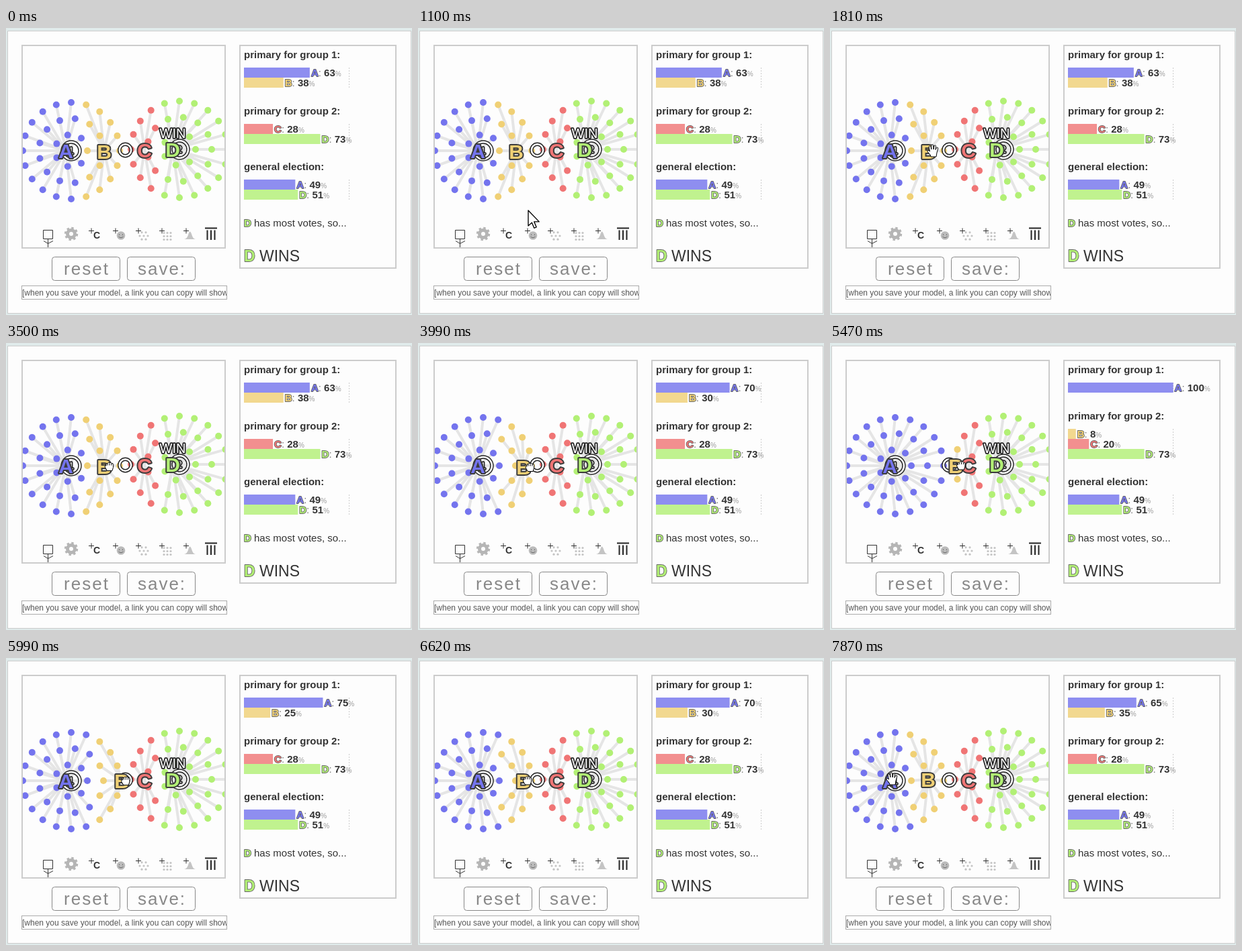
An HTML page for the animation above (8000 ms loop, 604 by 428 pixels).

```html
<!DOCTYPE html>
<html lang="en">
<head>
<meta charset="utf-8">
<title>Primary election sandbox</title>
<style>
html, body { margin: 0; width: 100%; height: 100%; overflow: hidden; background: #e0ebeb; }
svg { display: block; width: 604px; height: 428px; font-family: "Liberation Sans", Arial, sans-serif; font-size: 15px; fill: #333; }
.name { font-weight: bold; font-size: 30px; text-anchor: middle; stroke: #3c3c3c; stroke-width: 4px; stroke-linejoin: round; paint-order: stroke; }
.tag { font-weight: bold; stroke: #666; stroke-width: 1.8px; stroke-linejoin: round; paint-order: stroke; }
.white { fill: #fff; stroke: #222; stroke-width: 3.4px; stroke-linejoin: round; paint-order: stroke; text-anchor: middle; }
.title { font-weight: bold; }
.button { font-size: 26px; letter-spacing: 2px; text-anchor: middle; fill: #888; }
.box { fill: none; stroke: #ccc; stroke-width: 2; }
.thin { fill: none; stroke: #333; stroke-width: 1; }
</style>
</head>
<body>
<svg id="stage" viewBox="0 0 604 428">
  <defs>
    <clipPath id="arena"><rect x="25" y="27" width="300.5" height="300"/></clipPath>
    <clipPath id="field"><rect x="24" y="385" width="304" height="19"/></clipPath>
  </defs>
  <rect x="2.5" y="4.5" width="600" height="421" fill="#fdfdfd" stroke="#ccc"/>
  <g clip-path="url(#arena)">
    <g id="voters"></g>
    <g id="rings"></g>
    <g id="names"></g>
    <g id="tools"></g>
  </g>
  <rect class="box" x="24" y="26" width="302" height="302"/>
  <rect class="box" x="348" y="26" width="232" height="332"/>
  <rect id="reset" x="68.5" y="341.5" width="101" height="35" rx="4" stroke="#888"/>
  <text class="button" x="120" y="368">reset</text>
  <rect x="180.5" y="341.5" width="101" height="35" rx="4" fill="#fdfdfd" stroke="#888"/>
  <text class="button" x="232" y="368">save:</text>
  <rect x="23.5" y="384.5" width="305" height="20" fill="#fff" stroke="#aaa"/>
  <text x="24" y="399" font-size="12" fill="#555" clip-path="url(#field)">[when you save your model, a link you can copy will show up here]</text>
  <g id="panel"></g>
  <g id="cursor"></g>
</svg>
<script>
const LOOP = 8000;
const COLORS = { A: '#7474ee', B: '#f0d075', C: '#f07575', D: '#b2f075' };
const GROUPS = [{ x: 97, y: 183 }, { x: 258, y: 181 }];
const RINGS = [[24, 7], [48, 13], [72, 20]];
const $ = id => document.getElementById(id);

// Candidate B while dragged: time, x, y
const DRAG = [
  [0, 146, 183.5], [3750, 148, 184], [3870, 152, 184.5], [3990, 157, 185], [4110, 161, 185.5],
  [4230, 165, 186], [4380, 168, 186.5], [4530, 172.5, 187], [4680, 175, 187], [4800, 176.5, 186.5],
  [5050, 181, 185], [5200, 184, 184], [5320, 186, 183], [5470, 187, 182.5],
  [5750, 183, 182.5], [5870, 176, 183], [5990, 172, 183], [6110, 168, 183], [6260, 165, 183],
  [6380, 162, 183], [6500, 160, 183], [6620, 156.5, 182.5], [6740, 150, 181.5], [6860, 146, 181]
];

// Cursor: time, shape, x, y
const POINTER = [
  [0, 'none', 0, 0], [680, 'arrow', 71, 403], [800, 'link', 107.5, 377], [950, 'arrow', 143, 313],
  [1100, 'arrow', 164, 272], [1220, 'arrow', 170, 245], [1390, 'arrow', 170, 203], [1540, 'open', 163, 190],
  [1660, 'open', 158, 183], [1810, 'open', 153, 183], [3500, 'fist', 153.5, 184], [3750, 'drag', 0, 0],
  [7480, 'open', 153, 180], [7630, 'arrow', 134, 185], [7750, 'arrow', 108, 183], [7870, 'open', 92, 180]
];

const SHAPES = {
  arrow: ['M0 0V17L4 13.5 6.5 19.5 9 18.5 6.5 12.5H12Z', 0, 0, 1.35],
  open: ['M6 19L5 16 1.5 12Q.3 10 1.8 9.4Q3 9 4.5 11L3.2 5Q3 3 4.4 2.8Q5.6 2.7 6 4.4L6.8 8V2.2Q7 .8 8.3 .8Q9.6 .8 9.7 2.2L10 8 11 3Q11.4 1.6 12.6 1.9Q13.7 2.2 13.5 3.8L13 8.5 14.4 5.8Q15.2 4.6 16.2 5.2Q17 5.8 16.6 7.2L15 13 14.5 16 14 19Z', 9, 10, 1],
  fist: ['M4 13L1.5 9Q0 6.5 1 5.5Q2 5 2.5 5.5L2.2 3.5Q2.5 1.5 4.5 2Q6 0 7.5 1.2Q9.5 .2 10.5 1.8Q13 1.5 13.2 4L13 8 11.5 13ZM4.5 2.5V5M7.5 2V5M10.5 2.5V5', 7, 6.5, 1],
  link: ['M6 21V18L1.5 12.5Q.3 10.7 1.6 10Q3 9.5 5 12V2.2Q5.2 .8 6.5 .8Q7.8 .8 7.9 2.2V8Q9.5 7 10.5 8.4Q12 7.8 13 9.2Q16 8.8 16 11.5L15.5 16 14 18.5V21Z', 8.5, 11, 1]
};

const indexAt = (track, t) => {
  let i = track.length - 1;
  while (track[i][0] > t) i--;
  return i;
};
const dist2 = (p, q) => (p.x - q.x) ** 2 + (p.y - q.y) ** 2;
const nearest = (p, list) => list.reduce((a, b) => dist2(p, b) < dist2(p, a) ? b : a);

const crowd = GROUPS.map(g => RINGS.flatMap(([r, n]) =>
  Array.from({ length: n }, (_, i) => {
    const a = 2 * Math.PI * i / n;
    return { x: g.x + r * Math.cos(a), y: g.y + r * Math.sin(a) };
  })));

function count(voters, list) {
  const picks = voters.map(v => nearest(v, list));
  const rows = list.map(c => ({ c, share: picks.filter(p => p === c).length / voters.length }));
  return { picks, rows, winner: rows.reduce((a, b) => b.share > a.share ? b : a).c };
}

function drawVoters(results) {
  let lines = '', dots = '';
  results.forEach((res, g) => crowd[g].forEach((v, i) => {
    const c = res.picks[i], x = v.x.toFixed(1), y = v.y.toFixed(1);
    lines += `M${x} ${y}L${c.x} ${c.y}`;
    dots += `<circle cx="${x}" cy="${y}" r="5" fill="${COLORS[c.id]}"/>`;
  }));
  $('voters').innerHTML = `<path d="${lines}" stroke="#e5e5e5" stroke-width="4"/>` + dots;
}

const tag = id => `<tspan class="tag" fill="${COLORS[id]}">${id}</tspan>`;

function drawBlock(title, y, rows) {
  const top = y + 14, bottom = top + 15 * rows.length;
  let out = `<text class="title" x="354" y="${y}">${title}</text>
    <path d="M510.5 ${top}V${bottom}" stroke="#ccc" stroke-dasharray="2 2"/>`;
  rows.forEach(({ c, share }, i) => {
    const w = share * 156.6, by = top + 15 * i;
    out += `<rect x="354" y="${by}" width="${w}" height="15" fill="${COLORS[c.id]}" opacity=".8"/>
      <text x="${356 + w}" y="${by + 13}">${tag(c.id)}<tspan fill="#777">: </tspan><tspan font-weight="bold">${Math.round(share * 100)}</tspan><tspan font-size="10" fill="#999">%</tspan></text>`;
  });
  return out;
}

function drawPanel(primaries, final) {
  const second = 99 + 15 * primaries[0].rows.length;
  const w = final.winner.id;
  $('panel').innerHTML = drawBlock('primary for group 1:', 45, primaries[0].rows) +
    drawBlock('primary for group 2:', second, primaries[1].rows) +
    drawBlock('general election:', 212, final.rows) +
    `<text x="354" y="296">${tag(w)} has most votes, so...</text>
     <text x="354" y="348" font-size="23">${tag(w)} WINS</text>`;
}

function drawNames(list, winner) {
  $('names').innerHTML = list.map(c =>
    `<text class="name" x="${c.x}" y="${c.y + 11}" fill="${COLORS[c.id]}">${c.id}</text>`).join('') +
    `<text class="white" x="${winner.x}" y="${winner.y - 17}" font-size="20">WIN</text>`;
}

function drawModel(step) {
  const [, x, y] = DRAG[step];
  const list = [
    { id: 'A', x: 89, y: 183 }, { id: 'B', x, y },
    { id: 'C', x: 206, y: 182 }, { id: 'D', x: 248, y: 181 }
  ];
  const primaries = GROUPS.map((g, i) => count(crowd[i], list.filter(c => nearest(c, GROUPS) === g)));
  const final = count(crowd.flat(), primaries.map(p => p.winner));
  drawVoters(primaries);
  drawNames(list, final.winner);
  drawPanel(primaries, final);
}

function drawCursor(t, step) {
  let [, kind, x, y] = POINTER[indexAt(POINTER, t)];
  if (kind === 'none') return $('cursor').innerHTML = '';
  if (kind === 'drag') {
    const [from, bx, by] = DRAG[step];
    const lead = t < from + 600 ? 0.4 * (bx - DRAG[step - 1][1]) : 0;
    kind = 'fist';
    x = bx + 7.5 + lead;
    y = by;
  }
  const [d, ox, oy, s] = SHAPES[kind];
  $('cursor').innerHTML = `<path d="${d}" transform="translate(${x - ox * s} ${y - oy * s}) scale(${s})" fill="#fff" stroke="#000" stroke-linejoin="round"/>`;
}

function drawRings() {
  const ring = (x, y, r) => `<circle cx="${x}" cy="${y}" r="${r}" fill="none" stroke="#222" stroke-width="5.4"/>
    <circle cx="${x}" cy="${y}" r="${r}" fill="none" stroke="#fff" stroke-width="2.6"/>`;
  $('rings').innerHTML = GROUPS.map((g, i) => ring(g.x, g.y, 13) +
    `<text class="white" x="${g.x}" y="${g.y + 5}" font-size="14">${i + 1}</text>`).join('') + ring(177.5, 182, 8.7);
}

function drawTools() {
  const plus = [127, 163, 197, 232, 268].map(x => `M${x - 4} 302.5h8m-4 -4v8`).join('');
  const dot = (x, y) => `<circle cx="${x}" cy="${y}" r="1.6"/>`;
  let dots = dot(205, 310);
  for (let i = 0; i < 6; i++) {
    const a = i * Math.PI / 3;
    dots += dot(205 + 6 * Math.cos(a), 310 + 6 * Math.sin(a));
  }
  for (let i = 0; i < 9; i++) dots += dot(235 + 5 * (i % 3), 305.5 + 5 * Math.floor(i / 3));
  $('tools').innerHTML = `
    <path class="thin" d="M55.5 301.5h14v13h-14zM62.5 314.5V327M56 317.5L62.5 321.5 70 317.5"/>
    <g fill="none" stroke="#b5b5b5"><circle cx="97" cy="307" r="5.5" stroke-width="5"/>
    <circle cx="97" cy="307" r="8.7" stroke-width="3" stroke-dasharray="3.4 3.43"/></g>
    <path class="thin" d="${plus}"/>
    <text x="130" y="314" font-size="14" font-weight="bold">C</text>
    <circle cx="171" cy="309.5" r="6.3" fill="#bbb"/>
    <path d="M168.5 307.5v1.5M173.5 307.5v1.5M167.5 311q3.5 3.5 7 0" fill="none" stroke="#666"/>
    <g fill="#c4c4c4">${dots}<path d="M265 315Q270 314 271.5 307Q273.5 300 276 307Q277.5 314 282 315Z"/></g>
    <path d="M296 298.5H314M299.5 301.5V316M305 301.5V316M310.5 301.5V316" stroke="#222" stroke-width="2"/>`;
}

let lastStep = -1;
function render(t) {
  const step = indexAt(DRAG, t);
  if (step !== lastStep) drawModel(lastStep = step);
  $('reset').setAttribute('fill', t >= 950 && t < 1100 ? '#eee' : '#fdfdfd');
  drawCursor(t, step);
}

function tick() {
  render(performance.now() % LOOP);
  requestAnimationFrame(tick);
}

drawRings();
drawTools();
tick();
</script>
</body>
</html>
```
